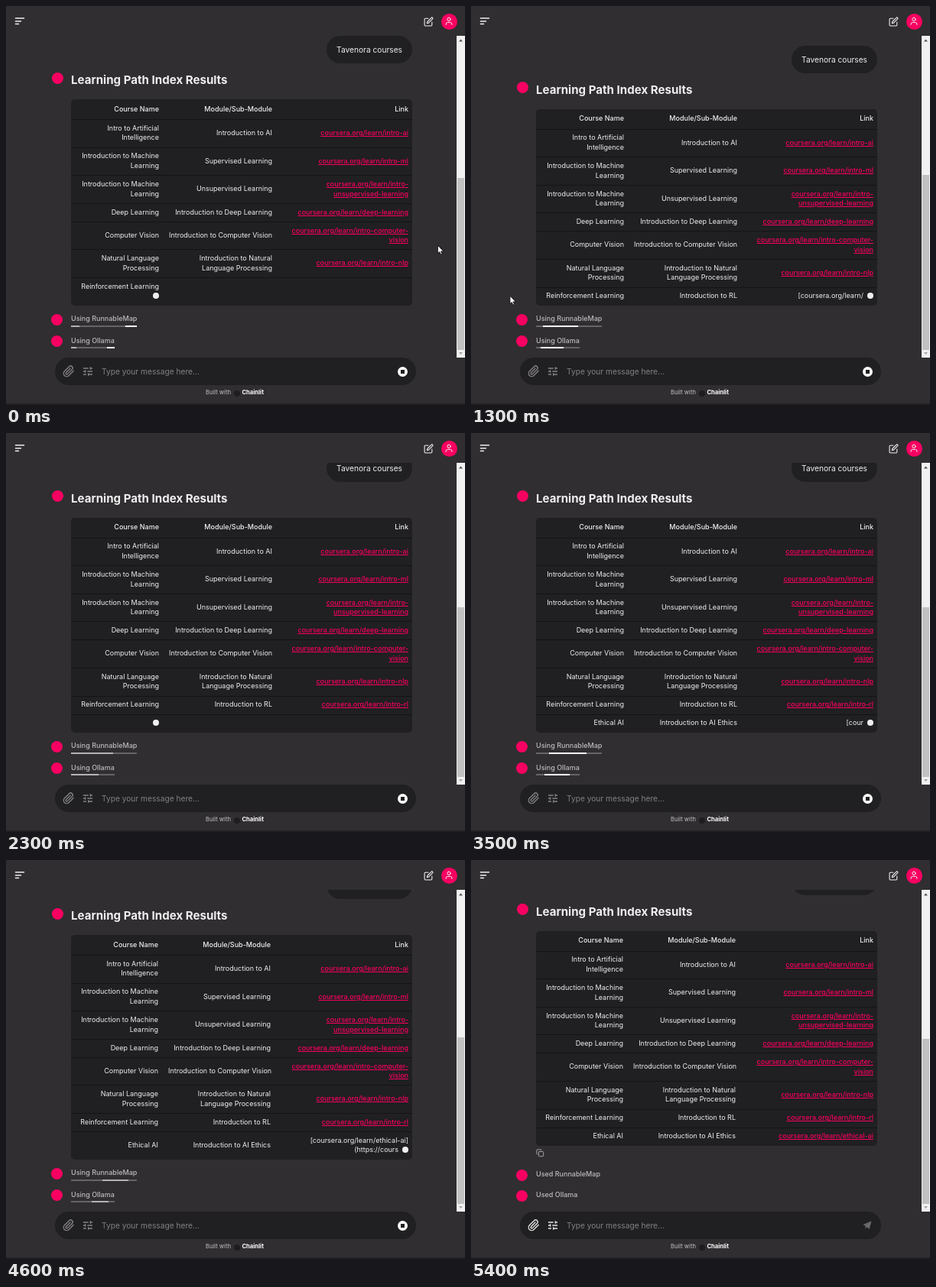
An HTML page for the animation above (7.3 s loop, 600x522 px).

```html
<!DOCTYPE html>
<html lang="en">
<head>
<meta charset="utf-8">
<title>Learning Path chat</title>
<style>
  :root { --bg: #302e30; --card: #201f21; --pink: #f80061; }
  html, body { margin: 0; width: 100%; height: 100%; overflow: hidden; }
  body { position: relative; background: var(--bg); color: #f0eff0; font: 400 9px/12.6px Inter, "Liberation Sans", sans-serif; }
  body * { box-sizing: border-box; }
  .abs, .mark, svg { position: absolute; }
  svg { fill: none; stroke: currentColor; stroke-width: 2; stroke-linecap: round; stroke-linejoin: round; overflow: visible; }
  .mark { width: 15px; height: 15px; border-radius: 50%; background: var(--pink); }
  #view { left: 0; top: 39px; width: 589px; height: 421px; overflow: hidden; }
  #reply { left: 85px; width: 446px; bottom: 68.5px; }
  .done #reply { bottom: 86.5px; }
  #pill { right: 0; top: -83px; height: 36px; padding: 0 13px; border-radius: 18px; background: var(--card); font-size: 10.2px; line-height: 36px; white-space: nowrap; }
  h1 { margin: 0; left: 0; top: -34px; font-size: 15.1px; line-height: 18px; font-weight: 700; white-space: nowrap; }
  #table { background: var(--card); border-radius: 5px; overflow: hidden; }
  .row { display: grid; grid-template-columns: 120px 148px 178px; align-items: center; min-height: 24px; padding: 5.7px 0; box-shadow: inset 0 1px #141315; }
  .wide .row { grid-template-columns: 119px 147px 180px; }
  .head { height: 26px; font-weight: 500; box-shadow: none; }
  .row div { padding: 0 5px 0 8px; text-align: right; white-space: nowrap; }
  .row .live { white-space: normal; overflow-wrap: anywhere; }
  .row .live:nth-child(3) { padding-left: 20px; }
  .row a { color: var(--pink); font-weight: 500; text-decoration: underline; text-underline-offset: 1px; text-decoration-thickness: .8px; }
  .dot { display: inline-block; width: 8px; height: 8px; margin-left: 5px; border-radius: 50%; background: #f0eff0; vertical-align: -.8px; }
  .step { left: 85px; color: #bdbcbd; font-weight: 500; white-space: nowrap; }
  .bar { left: 0; right: 0; top: 14.5px; height: 2.2px; background: #666466; overflow: hidden; }
  .bar i { position: absolute; top: 0; bottom: 0; background: #fff; }
  .bar i + i { background: #b4b3b4; }
  .done .bar, .running .end, .done .busy { display: none; }
  #input { left: 64px; top: 460px; width: 472px; height: 36px; border-radius: 18px; background: var(--card); }
  .tool { color: #858385; }
  .done .tool { color: #e6e5e6; }
</style>
</head>
<body class="running">
  <svg style="left:12px;top:14px" width="12" height="12" viewBox="0 0 12 12" stroke-width="1.5"><path d="M.5 2h11M.5 6h7M.5 9.6h4" stroke-width="1.5"/></svg>
  <svg style="left:546px;top:13.5px" width="13" height="13" viewBox="0 0 24 24"><path d="M11 4H4a2 2 0 0 0-2 2v14a2 2 0 0 0 2 2h14a2 2 0 0 0 2-2v-7M18.5 2.5a2.1 2.1 0 0 1 3 3L12 15l-4 1 1-4z"/></svg>
  <div class="mark" style="left:568.5px;top:9.5px;width:21px;height:21px"></div>
  <svg style="left:573px;top:14px" width="12" height="12" viewBox="0 0 24 24"><circle cx="12" cy="7" r="4.3"/><path d="M4 21v-1a5 5 0 0 1 5-5h6a5 5 0 0 1 5 5v1"/></svg>

  <div id="view" class="abs">
    <div id="reply" class="abs">
      <div id="pill" class="abs">Tavenora courses</div>
      <div class="mark" style="left:-25.5px;top:-35.5px"></div>
      <h1 class="abs">Learning Path Index Results</h1>
      <div id="table"></div>
      <svg class="end" style="left:0;bottom:-15px" width="10.5" height="10.5" viewBox="0 0 24 24" color="#b5b4b5"><rect x="8" y="8" width="14" height="14" rx="2"/><path d="M4 16a2 2 0 0 1-2-2V4a2 2 0 0 1 2-2h10a2 2 0 0 1 2 2"/></svg>
    </div>
  </div>
  <div id="steps"></div>

  <div class="abs" style="left:589px;top:39px;width:11px;height:421px;background:#f1f1f1">
    <div id="thumb" class="abs" style="left:1px;right:1px;bottom:10.5px;background:#c1c1c1"></div>
    <svg style="left:0;top:0" width="11" height="421" stroke="none"><path d="M3 7.5l2.5-3 2.5 3z" fill="#505050" stroke="none"/><path d="M3 414l2.5 3 2.5-3z" fill="#a3a3a3" stroke="none"/></svg>
  </div>

  <div id="input" class="abs">
    <svg class="tool" style="left:10px;top:10px" width="16" height="16" viewBox="0 0 24 24"><path d="M21.4 11l-9.2 9.2a6 6 0 0 1-8.5-8.5l9.2-9.2a4 4 0 0 1 5.7 5.7l-9.2 9.2a2 2 0 0 1-2.8-2.8l8.5-8.5"/></svg>
    <svg class="tool" style="left:35px;top:10px" width="16" height="16" viewBox="0 0 24 24"><path d="M3 6h10M17 6h4M17 3.5v5M3 12h4M11 12h10M7 9.5v5M3 18h6M13 18h8M13 15.5v5" stroke-linecap="butt"/></svg>
    <div class="abs" style="left:61px;top:0;font-size:10.2px;line-height:36px;color:#828082;white-space:nowrap">Type your message here...</div>
    <div class="abs busy" style="left:447.5px;top:11.5px;width:13px;height:13px;border-radius:50%;background:#fff"><div class="abs" style="left:4px;top:4px;width:5px;height:5px;background:var(--card)"></div></div>
    <svg class="end" style="left:448px;top:12px" width="12" height="12" viewBox="0 0 24 24"><path d="M1 10l22-9-6 21-6-6-4 5v-8l12-9L6 13z" fill="#6c6a6c" stroke="none"/></svg>
  </div>
  <div class="abs" style="left:261px;top:500px;font-size:7.6px;color:#c4c3c4;white-space:nowrap">Built with</div>
  <div class="mark" style="left:298px;top:502.5px;width:8px;height:8px;background:#1e1d1e"></div>
  <div class="abs" style="left:308.5px;top:500px;font-size:7.6px;font-weight:700;color:#fff">Chainlit</div>
  <div class="abs" style="left:0;right:0;top:519.5px;bottom:0;background:#222022"></div>
  <svg id="mouse" style="left:0;top:0" width="9" height="13" viewBox="0 0 9 13"><path d="M.5.5v10l2.3-2 1.6 3.6 1.7-.8-1.6-3.4h3.2z" fill="#fff" stroke="#111" stroke-width=".8"/></svg>

<script>
const LOOP = 7300, TICK = 100, END = 5400;
const $ = id => document.getElementById(id);

// "/" at a line end in these rows is written as "<br>"
const rows = [
  ["Intro to Artificial<br>Intelligence", "Introduction to AI", "intro-ai"],
  ["Introduction to Machine<br>Learning", "Supervised Learning", "intro-ml"],
  ["Introduction to Machine<br>Learning", "Unsupervised Learning", "intro-<br>unsupervised-learning"],
  ["Deep Learning", "Introduction to Deep Learning", "deep-learning"],
  ["Computer Vision", "Introduction to Computer Vision", "intro-computer-<br>vision"],
  ["Natural Language<br>Processing", "Introduction to Natural<br>Language Processing", "intro-nlp"]
];

// Markdown stream, one token per tick
const tokens = [
  "Reinforcement Learning", "", "|", "Introduction", " to", " RL", "|", "[",
  "c", "ours", "era", ".org", "/learn", "/", "intro", "-r", "l", "](",
  "https", "://", "coursera", ".org/learn", "/intro-rl)", "|\n", "",
  "Eth", "ical", " AI", "|", "Introduction", " to", " AI Ethics", "|[",
  "c", "", "our", "sera", ".org", "/learn", "/", "ethical", "-ai", "](", "",
  "https", "://", "cours", "era.org", "/learn", "/ethical-ai)"
];

const link = s => `<a>${s}</a>`;
const cell = (s, live) => `<div${live ? ' class="live"' : ""}>${s}${live ? '<span class="dot"></span>' : ""}</div>`;
const row = (cells, cls = "") => `<div class="row ${cls}">${cells.join("")}</div>`;

const fixed = row(["Course Name", "Module/Sub-Module", "Link"].map(s => cell(s)), "head") +
  rows.map(([a, b, c]) => row([cell(a), cell(b), cell(link("coursera.org/learn/" + c))])).join("");

function streamed(n) {
  const typing = n < tokens.length - 1;
  const lines = tokens.slice(0, n + 1).join("").split("\n");
  return lines.map((line, i) => {
    const parts = line.split("|").slice(0, 3);
    const last = typing && i === lines.length - 1 ? parts.length - 1 : -1;
    return row(parts.map((s, k) => cell(s.replace(/^\[(.*)\]\(.*\)$/, (_, t) => link(t)), k === last)));
  }).join("");
}

// Tool steps with indeterminate progress bars
const sweep = (from, to, easing) => [
  { left: from[0], right: from[1], easing },
  { left: to[0], right: to[1], offset: .6 },
  { left: to[0], right: to[1] }
];
const sweeps = [
  sweep(["-35%", "100%"], ["100%", "-90%"], "cubic-bezier(.65,.815,.735,.395)"),
  sweep(["-200%", "100%"], ["107%", "-8%"], "cubic-bezier(.165,.84,.44,1)")
];
const PERIOD = 2100, PHASE = 1180, LAG = 1150;
const bars = [];
const steps = [["RunnableMap", 409.5, 411.5], ["Ollama", 438, 438.5]].map(([name, y, yEnd]) => {
  const mark = document.createElement("div"), label = document.createElement("div");
  mark.className = "mark";
  mark.style.left = "59px";
  label.className = "abs step";
  label.innerHTML = `<span></span> ${name}<div class="abs bar"><i></i><i></i></div>`;
  $("steps").append(mark, label);
  label.querySelectorAll("i").forEach((el, i) => {
    const anim = el.animate(sweeps[i], { duration: PERIOD, iterations: Infinity });
    anim.pause();
    bars.push({ anim, shift: PHASE + i * (PERIOD - LAG) });
  });
  return { mark, label, y, yEnd };
});

const path = [[0, 564, 313], [100, 564, 313], [800, 120, 336], [1300, 50.5, 379], [1400, 28, 398]];
function moveMouse(t) {
  const k = path.findIndex(p => p[0] > t);
  const shown = t <= 1400;
  $("mouse").style.display = shown ? "" : "none";
  if (!shown) return;
  const b = path[k < 0 ? path.length - 1 : k], a = path[k < 0 ? path.length - 2 : k - 1];
  const f = (t - a[0]) / (b[0] - a[0]);
  $("mouse").style.transform = `translate(${a[1] + (b[1] - a[1]) * f}px, ${a[2] + (b[2] - a[2]) * f}px)`;
}

function render(t) {
  const done = t >= END;
  document.body.className = done ? "done" : "running";
  $("table").className = t >= 4100 ? "wide" : "";
  $("table").innerHTML = fixed + streamed(t / TICK);
  const height = $("table").getBoundingClientRect().height + (done ? 18 : 0);
  $("thumb").style.top = 186 + (height - 269.5) * .29 + "px";
  for (const s of steps) {
    const y = done ? s.yEnd : s.y;
    s.mark.style.top = y - 7 + "px";
    s.label.style.top = y - 6.3 + "px";
    s.label.firstChild.textContent = done ? "Used" : "Using";
  }
  for (const b of bars) b.anim.currentTime = t + b.shift;
  moveMouse(t);
}

let shown = -1;
function frame() {
  const t = Math.min(END, Math.floor(performance.now() % LOOP / TICK) * TICK);
  if (t !== shown) render(shown = t);
  requestAnimationFrame(frame);
}
frame();
</script>
</body>
</html>
```
